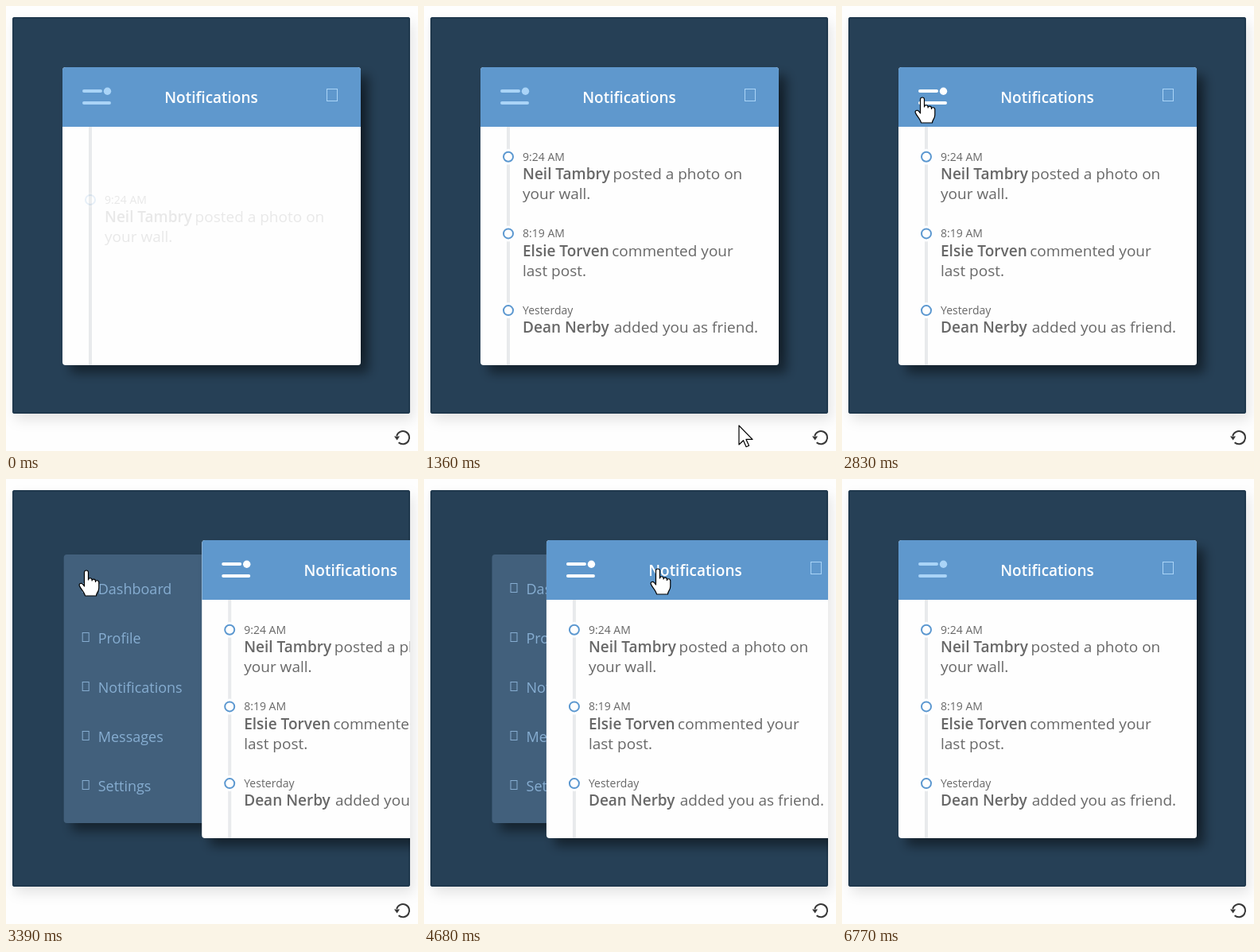
These frames come from a looping animation (518x560 px, 7590 ms). An HTML page:

```html
<!DOCTYPE html>
<html lang="en">
<head>
<meta charset="utf-8">
<title>Notifications</title>
<style>
  html, body { margin: 0; width: 100%; height: 100%; overflow: hidden; background: #fefefe; }
  svg { display: block; width: 518px; height: 560px; }
  text { font-family: "Open Sans", sans-serif; white-space: pre; }
  .title { font-size: 19px; font-weight: 600; fill: #fff; text-anchor: middle; }
  .row { font-size: 19px; fill: #686868; }
  .row .time { font-size: 14px; }
  .row .name { font-weight: 600; }
  .ring { fill: #fefefe; stroke: #5c98d0; stroke-width: 2; }
  #menu text { font-size: 18px; fill: #86add1; }
  .glyph { fill: none; stroke: #86add1; }
  #search text { font-family: "Liberation Sans", Arial, sans-serif; font-size: 17.8px; fill: #757575; }
  #cursor path { stroke: #000; stroke-width: 1.2; stroke-linejoin: round; fill: #fff; }
</style>
</head>
<body>
<svg viewBox="0 0 518 560">
  <defs>
    <filter id="soft" x="-20%" y="-20%" width="140%" height="140%">
      <feDropShadow dx="4" dy="8" stdDeviation="8" flood-opacity=".1"/>
    </filter>
    <filter id="deep" x="-20%" y="-20%" width="140%" height="140%">
      <feDropShadow dx="10" dy="10" stdDeviation="7" flood-opacity=".45"/>
    </filter>
    <clipPath id="stageClip"><rect x="8" y="14" width="500" height="499" rx="3"/></clipPath>
    <clipPath id="cardClip"><rect x="71" y="77" width="375" height="375" rx="4"/></clipPath>
  </defs>

  <rect x="8" y="14" width="500" height="499" rx="3" fill="#274156" filter="url(#soft)"/>
  <rect x="9" y="15" width="498" height="497" rx="2" fill="none" stroke="#1f384d" stroke-width="2"/>

  <g clip-path="url(#stageClip)">
    <g id="menu">
      <rect x="71" y="95" width="338" height="338" rx="4" fill="#43617c" filter="url(#deep)"/>
    </g>
    <g id="card">
      <rect x="71" y="77" width="375" height="375" rx="4" fill="#fefefe" filter="url(#deep)"/>
      <g clip-path="url(#cardClip)">
        <rect x="104" y="152" width="4" height="300" fill="#e8eaec"/>
        <g id="rows"></g>
        <rect x="71" y="77" width="375" height="75" fill="#5f98cd"/>
        <text class="title" x="258" y="121.5">Notifications</text>
        <g id="burger" stroke-width="4" stroke-linecap="round">
          <path d="M98 107H119M98 122H130"/>
          <circle cx="127.5" cy="107.3" r="4.7" stroke="none"/>
        </g>
        <g id="search">
          <rect x="89" y="90.5" width="320" height="48" rx="24" fill="#fff"/>
          <text x="112.7" y="120.3">Search ...</text>
        </g>
        <rect id="lens" x="403.5" y="104.5" width="13" height="15" fill="none"/>
      </g>
    </g>
  </g>

  <path d="M491.2 541A8.1 8.1 0 1 1 493.6 549.2" fill="none" stroke="#383838" stroke-width="2"/>
  <path d="M488 541.5H495L491.7 546.5Z" fill="#383838"/>

  <g id="cursor">
    <path id="arrow" d="M0 0V24L5.5 18.7 9.1 26.7 12.6 25.2 9 17.4H17Z"/>
    <path id="hand" d="M-2.5 20V2.5A2.5 2.5 0 0 1 2.5 2.5V12C2.5 9 7.1 9 7.1 12V13C7.1 10.4 11.5 10.4 11.5 13.4V14.4C11.5 12 15.8 12.2 15.8 15.2V22C15.8 27 12.5 28 12.5 32H-1.5C-2.5 27-7.5 23-8.8 19C-9.4 16.4-6.2 15.4-4.3 17.6Z"/>
  </g>
</svg>

<script>
const LOOP = 7590;
const $ = id => document.getElementById(id);
const clamp = v => Math.min(1, Math.max(0, v));
const smooth = u => u * u * (3 - 2 * u);

// The standard CSS "ease" curve, cubic-bezier(.25, .1, .25, 1)
function ease(x) {
  if (x <= 0 || x >= 1) return clamp(x);
  let lo = 0, hi = 1;
  for (let i = 0; i < 20; i++) {
    const s = (lo + hi) / 2;
    if (.75 * s * (1 - s) + s ** 3 < x) lo = s; else hi = s;
  }
  return .3 * lo * (1 - lo) ** 2 + 3 * lo * lo * (1 - lo) + lo ** 3;
}

const progress = (t, start, length) => ease((t - start) / length);
const toggle = (t, on, off, length) => progress(t, on, length) - progress(t, off, length);

const entries = [
  ["9:24 AM", "Neil Tambry", 237.6, "posted a photo on", "your wall."],
  ["8:19 AM", "Elsie Torven", 236.2, "commented your", "last post."],
  ["Yesterday", "Dean Nerby", 238.8, "added you as friend.", ""]
];
$("rows").innerHTML = entries.map(([time, name, x, first, second], i) => {
  const y = 189.7 + 96.7 * i;
  return `<g class="row">
    <circle cx="106" cy="${y}" r="10" fill="#fefefe"/>
    <circle class="ring" cx="106" cy="${y}" r="6"/>
    <text class="time" x="124" y="${y + 5}">${time}</text>
    <text class="name" x="124" y="${y + 28.3}">${name}</text>
    <text x="${x}" y="${y + 28.3}">${first}</text>
    <text x="124" y="${y + 53.3}">${second}</text>
  </g>`;
}).join("");
const rows = [...$("rows").children];

$("menu").innerHTML += ["Dashboard", "Profile", "Notifications", "Messages", "Settings"].map((label, i) => {
  const y = 144.5 + 62 * i;
  return `<rect class="glyph" x="94.5" y="${y - 13}" width="8" height="11"/>
    <text x="114" y="${y}">${label}</text>`;
}).join("");

// Pointer stops: time, x, y
const stops = [
  [1360, 396, 528], [2100, 380, 318], [2800, 101, 115], [3650, 101, 115],
  [3960, 294, 113], [5200, 294, 113], [5520, 410, 107], [6220, 410, 107], [6600, 500, 306]
];
const burgerHover = [[2700, 3640], [3930, 5230]];
const lensHover = [[5420, 6280]];

function pointer(t) {
  const i = stops.findIndex(s => s[0] > t);
  if (i < 1) return null;
  const [t0, x0, y0] = stops[i - 1], [t1, x1, y1] = stops[i];
  const u = smooth((t - t0) / (t1 - t0));
  return [x0 + (x1 - x0) * u, y0 + (y1 - y0) * u];
}

function tint(t, spans) {
  const k = spans.reduce((sum, [on, off]) => sum + toggle(t, on, off, 130), 0);
  const mix = c => Math.round(c + (255 - c) * k);
  return `rgb(${mix(170)},${mix(212)},${mix(247)})`;
}

function draw(t) {
  rows.forEach((row, i) => {
    const p = progress(t, -75 + 170 * i, 600);
    row.setAttribute("opacity", p);
    row.setAttribute("transform", `translate(0 ${63 * (1 - p)})`);
  });

  const open = toggle(t, 2890, 4445, 730);
  $("card").setAttribute("transform", `translate(${187.5 * open} 0)`);
  $("menu").setAttribute("transform", `translate(${26 * (1 - open)} 0)`);

  const find = toggle(t, 5550, 6190, 280);
  $("search").setAttribute("opacity", find);
  $("search").setAttribute("transform",
    `translate(249 114.5) scale(${.88 + .12 * find}) translate(-249 -114.5)`);

  const burger = tint(t, burgerHover);
  $("burger").setAttribute("stroke", burger);
  $("burger").setAttribute("fill", burger);
  $("lens").setAttribute("stroke", tint(t, lensHover));

  const at = pointer(t);
  $("cursor").style.display = at ? "" : "none";
  if (at) {
    const hand = [...burgerHover, ...lensHover].some(([on, off]) => t >= on && t < off);
    $("cursor").setAttribute("transform", `translate(${at})`);
    $("hand").style.display = hand ? "" : "none";
    $("arrow").style.display = hand ? "none" : "";
  }
}

function tick() {
  draw(performance.now() % LOOP);
  requestAnimationFrame(tick);
}
tick();
</script>
</body>
</html>
```
